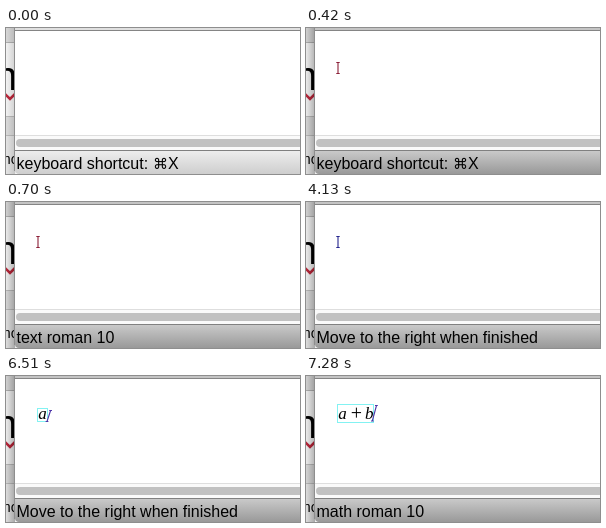
An HTML page that plays this animation: 294x146 px, repeating every 8000 ms.

```html
<!DOCTYPE html>
<html lang="en">
<head>
<meta charset="utf-8">
<title>Math input in an editor</title>
<style>
html, body { margin: 0; width: 100%; height: 100%; overflow: hidden; background: #fff; }
svg { display: block; width: 294px; height: 146px; }
text { font-family: "Liberation Sans", Arial, sans-serif; fill: #000; }
.status text { font-size: 16px; }
.math text { font: italic 17px "Liberation Serif", serif; }
.math .plus { font: 20px "Liberation Serif", serif; }
.math rect { fill: none; stroke: #83f2f2; }
.caret { fill: none; stroke-width: 1.1; }
.red { stroke: #8c2038; }
.blue { stroke: #26268e; }
.violet { stroke: #4d36a8; }

.step { visibility: hidden; animation: 8s step-end infinite; }
.idle { animation-name: idle; }
.active { animation-name: active; }
.shortcut { animation-name: shortcut; }
.roman { animation-name: roman; }
.hint { animation-name: hint; }
.mode { animation-name: mode; }
.text-caret { animation-name: text-caret; }
.math-caret { animation-name: math-caret; }
.m1 { animation-name: m1; }
.m2 { animation-name: m2; }
.m3 { animation-name: m3; }
@keyframes idle { 0% { visibility: visible } 5.25%, 100% { visibility: hidden } }
@keyframes active { 0% { visibility: hidden } 5.25%, 100% { visibility: visible } }
@keyframes shortcut { 0% { visibility: visible } 8.75%, 100% { visibility: hidden } }
@keyframes roman { 0%, 51.625%, 100% { visibility: hidden } 8.75% { visibility: visible } }
@keyframes hint { 0%, 84.875%, 100% { visibility: hidden } 51.625% { visibility: visible } }
@keyframes mode { 0% { visibility: hidden } 84.875%, 100% { visibility: visible } }
@keyframes text-caret { 0%, 47.25%, 100% { visibility: hidden } 5.25% { visibility: visible } }
@keyframes math-caret { 0%, 81.375%, 100% { visibility: hidden } 47.25% { visibility: visible } }
@keyframes m1 { 0%, 86.625%, 100% { visibility: hidden } 81.375% { visibility: visible } }
@keyframes m2 { 0%, 91%, 100% { visibility: hidden } 86.625% { visibility: visible } }
@keyframes m3 { 0% { visibility: hidden } 91%, 100% { visibility: visible } }
</style>
</head>
<body>
<svg viewBox="0 0 294 146">
  <defs>
    <linearGradient id="light" x2="0" y2="1">
      <stop stop-color="#ededed"/><stop offset="1" stop-color="#cecece"/>
    </linearGradient>
    <linearGradient id="dark" x2="0" y2="1">
      <stop stop-color="#c9c9c9"/><stop offset="1" stop-color="#999"/>
    </linearGradient>
    <linearGradient id="shade">
      <stop stop-opacity=".08"/><stop offset="1" stop-opacity=".3"/>
    </linearGradient>
    <path id="beam" d="M30.3 34.5H33.7M32 34.5V45.5M30.3 45.5H33.7"/>
    <path id="slant" d="M2.2 0H5M3.6 0L0 11M-1.4 11H1.4"/>
  </defs>

  <!-- window behind -->
  <rect width="10" height="146" fill="#fff"/>
  <rect width="10" height="14" fill="#e2e2e2"/>
  <rect y="14" width="10" height="1" fill="#b8b8b8"/>
  <rect y="88" width="10" height="19" fill="#e6e6e6"/>
  <rect y="88" width="10" height="1" fill="#c4c4c4"/>
  <rect y="107" width="10" height="1" fill="#c4c4c4"/>
  <rect y="108" width="10" height="38" fill="#f0f0f0"/>
  <text x="-11" y="62" font-size="40">n</text>
  <path d="M-1 66L4 71L10 65" fill="none" stroke="#c5283d" stroke-width="2.6"/>
  <text x="-7" y="136" font-size="14">mo</text>
  <rect class="step idle" width="9" height="146" fill="url(#shade)" opacity=".6"/>
  <rect class="step active" width="9" height="146" fill="url(#shade)"/>

  <!-- editor window -->
  <rect x="9" width="285" height="123" fill="#fff"/>
  <rect class="step idle" x="9" width="285" height="2" fill="#e0e0e0"/>
  <rect class="step active" x="9" width="285" height="2" fill="#c4c4c4"/>
  <rect x="9" y="2" width="285" height="1" fill="#858585"/>
  <rect x="8" width="1" height="143" fill="#8e8e8e"/>
  <rect x="9" y="107" width="285" height="15" fill="#fafafa"/>
  <rect x="9" y="107" width="285" height="1" fill="#dedede"/>
  <rect x="10" y="111" width="300" height="8" rx="4" fill="#c1c1c1"/>
  <path class="step idle" d="M9 123H294V146H13Q9 146 9 142Z" fill="url(#light)"/>
  <path class="step active" d="M9 123H294V146H13Q9 146 9 142Z" fill="url(#dark)"/>
  <rect x="9" y="122" width="285" height="1" fill="#808080"/>

  <g class="status">
    <text class="step shortcut" x="10.5" y="141">keyboard shortcut: <tspan x="147" font-family="DejaVu Sans, sans-serif" font-size="15">⌘</tspan><tspan x="162">X</tspan></text>
    <text class="step roman" x="10.5" y="141">text roman 10</text>
    <text class="step hint" x="10.5" y="141">Move to the right when finished</text>
    <text class="step mode" x="10.5" y="141">math roman 10</text>
  </g>

  <use href="#beam" class="step caret red text-caret"/>
  <use href="#beam" class="step caret blue math-caret"/>

  <g class="math">
    <g class="step m1">
      <rect x="31.5" y="32.5" width="10" height="13"/>
      <text x="32.3" y="43">a</text>
      <use href="#slant" class="caret violet" x="41" y="34.5"/>
    </g>
    <g class="step m2">
      <rect x="31.5" y="29.5" width="26" height="17"/>
      <text x="32.3" y="43">a</text>
      <text class="plus" x="44.7" y="43.5">+</text>
      <use href="#slant" class="caret violet" x="57" y="34"/>
    </g>
    <g class="step m3">
      <rect x="31.5" y="28.5" width="36" height="18"/>
      <text x="32.3" y="43">a</text>
      <text class="plus" x="44.7" y="43.5">+</text>
      <text x="59" y="43">b</text>
      <path class="caret violet" d="M69 29.5H71.8M70.5 29.5L66.3 45M65 45H67.7"/>
    </g>
  </g>
</svg>
</body>
</html>
```
